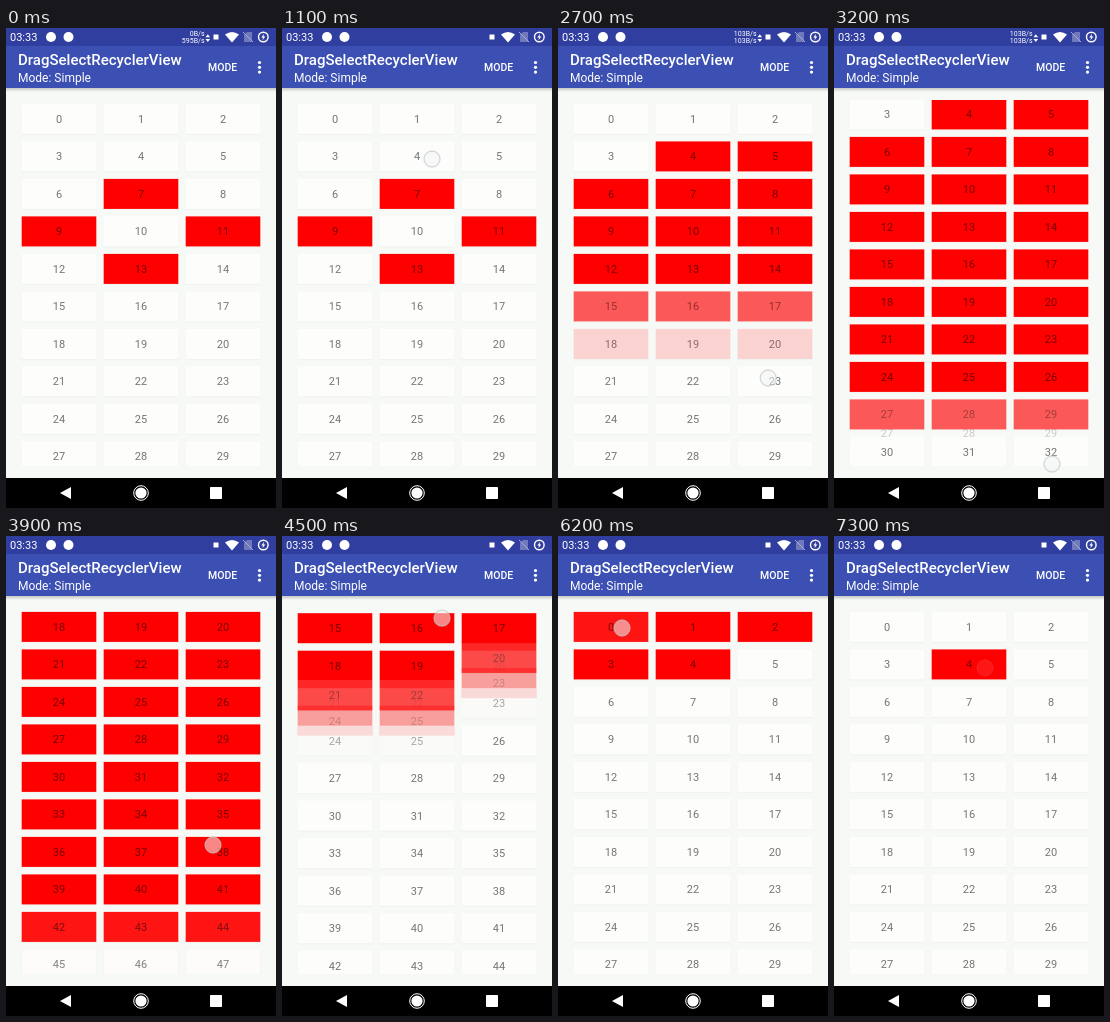
Animation, 270 px wide and 480 px high, one loop 7.4 s. Source, as an HTML page with a canvas:

```html
<!DOCTYPE html>
<html lang="en">
<head>
<meta charset="utf-8">
<title>Drag select list</title>
<style>
  html, body { margin: 0; width: 100%; height: 100%; overflow: hidden; background: #f6f9f5; }
  canvas, svg { position: absolute; left: 0; top: 0; width: 270px; height: 480px; display: block; }
  text { font-family: Roboto, sans-serif; fill: #fff; }
  .medium { font-weight: 500; }
  .speed { font-size: 7px; text-anchor: end; }
</style>
</head>
<body>
<svg viewBox="0 0 270 480">
  <defs>
    <linearGradient id="shade" x2="0" y2="1">
      <stop stop-color="#000" stop-opacity=".2"/>
      <stop offset="1" stop-color="#000" stop-opacity="0"/>
    </linearGradient>
  </defs>
  <rect y="60" width="270" height="4" fill="url(#shade)"/>
  <rect width="270" height="18" fill="#303f9f"/>
  <rect y="18" width="270" height="42" fill="#3b50b2"/>

  <text x="4" y="13" font-size="11">03:33</text>
  <g fill="#fff">
    <circle cx="45" cy="9" r="5"/>
    <circle cx="62.5" cy="9" r="5"/>
    <rect x="207.5" y="6.5" width="5" height="5"/>
    <path d="M219 6.5Q226 1.5 233 6.5L226 14.5Z"/>
  </g>
  <g id="net" fill="#fff">
    <text id="up" class="speed" x="198.5" y="8.3"></text>
    <text id="down" class="speed" x="198.5" y="15"></text>
    <path d="M199.5 9.3h4.6l-2.3-3zM199.5 11h4.6l-2.3 3z"/>
  </g>
  <path d="M238 14V7l3-3h5v10z" fill="#7079bb"/>
  <path d="M237 4l10 10" stroke="#a5abd5"/>
  <circle cx="257.3" cy="9" r="4.8" fill="none" stroke="#fff" stroke-width="1.4"/>
  <path d="M258 5.8l-2.7 3.7h1.7l-.5 2.8 2.8-3.9h-1.8z" fill="#fff"/>

  <text class="medium" x="12" y="37" font-size="15">DragSelectRecyclerView</text>
  <text x="12" y="54" font-size="12">Mode: Simple</text>
  <text class="medium" x="202" y="43" font-size="10.5">MODE</text>
  <g fill="#fff">
    <circle cx="253.5" cy="34.5" r="1.6"/>
    <circle cx="253.5" cy="39.3" r="1.6"/>
    <circle cx="253.5" cy="44.1" r="1.6"/>
  </g>

  <rect y="450" width="270" height="30"/>
  <path d="M54 465l11-6v12z" fill="#fff"/>
  <circle cx="135" cy="465" r="7.3" fill="none" stroke="#fff"/>
  <circle cx="135" cy="465" r="5.6" fill="#fff"/>
  <rect x="204" y="459" width="12" height="12" rx=".8" fill="#fff"/>
</svg>
<canvas id="list"></canvas>
<script>
const LOOP = 7400, TICK = 100, FADE = 250;
const COUNT = 48, ANCHOR = 4, PITCH_X = 82, PITCH_Y = 37.5;
const CELL = { x: 15.7, y: 75.9, w: 74.6, h: 30 };

// [time, end of the dragged range]
const drag = [
  [1250, 4], [1890, 7], [2150, 8], [2300, 11], [2420, 14], [2540, 17], [2660, 20],
  [2780, 23], [2900, 26], [3040, 29], [3240, 32], [3310, 35], [3380, 38], [3450, 41],
  [3520, 44], [3590, 47], [3670, 44], [3890, 41], [3970, 38], [4040, 35], [4110, 32],
  [4180, 28], [4250, 25], [4340, 22], [4460, 19], [4620, 16], [4790, 13], [4950, 10],
  [5120, 7], [5350, 4], [5650, 1], [5970, 0], [6300, 1], [6440, 4]
];
// [time, offset]
const scrollKeys = [[2850, 0], [3040, 23], [3200, 42], [3300, 78], [3620, 225],
  [4300, 225], [5120, 66], [5200, 59], [5700, 0]];
// [time, x, y]
const touchKeys = [[1700, 150, 131], [2000, 154, 186], [2500, 205, 300], [3000, 218, 425],
  [3200, 218, 436], [3600, 218, 434], [3900, 207, 309], [4250, 165, 95], [4600, 158, 77],
  [5400, 158, 77], [5900, 76, 90], [6200, 64, 92], [6350, 130, 100], [6550, 151, 132]];
const touchAlpha = [[600, 0], [800, 1], [6900, 1], [7300, .16]];

function at(keys, t, k = 1) {
  const i = keys.findIndex(key => key[0] > t);
  if (i === 0) return keys[0][k];
  if (i < 0) return keys[keys.length - 1][k];
  const a = keys[i - 1], b = keys[i];
  return a[k] + (b[k] - a[k]) * (t - a[0]) / (b[0] - a[0]);
}

// Every item keeps a log of its selection changes.
const items = Array.from({ length: COUNT }, (_, i) => [{ t: -FADE, on: [7, 9, 11, 13].includes(i) }]);
const inRange = (i, end) => end !== null && i >= Math.min(ANCHOR, end) && i <= Math.max(ANCHOR, end);
let lastEnd = null;
for (const [t, end] of drag) {
  items.forEach((log, i) => {
    const on = inRange(i, end);
    if (on !== inRange(i, lastEnd)) log.push({ t, on });
  });
  lastEnd = end;
}

const canvas = document.getElementById('list');
const ctx = canvas.getContext('2d');
const ratio = window.devicePixelRatio || 1;
canvas.width = 270 * ratio;
canvas.height = 480 * ratio;
ctx.scale(ratio, ratio);

function drawCell(i, scroll, on, alpha) {
  const x = CELL.x + i % 3 * PITCH_X;
  const y = CELL.y + Math.floor(i / 3) * PITCH_Y - scroll;
  if (y > 440 || y + CELL.h < 70) return;
  ctx.globalAlpha = alpha;
  ctx.fillStyle = 'rgba(0,0,0,.025)';
  ctx.fillRect(x - .5, y + .5, CELL.w + 1, CELL.h + .7);
  ctx.fillStyle = on ? '#f00' : '#fdfefc';
  ctx.fillRect(x, y, CELL.w, CELL.h);
  ctx.fillStyle = 'rgba(0,0,0,.54)';
  ctx.fillText(i, x + CELL.w / 2, y + CELL.h / 2 + 4);
}

function drawList(t) {
  const scroll = at(scrollKeys, t);
  ctx.save();
  ctx.beginPath();
  ctx.rect(0, 72, 270, 366);
  ctx.clip();
  ctx.font = '11px Roboto, sans-serif';
  ctx.textAlign = 'center';
  items.forEach((log, i) => {
    let n = log.length - 1;
    while (log[n].t > t) n--;
    const p = Math.min(1, (t - log[n].t) / FADE);
    if (p < 1) {
      // the outgoing view lags behind the scroll
      const lag = at(scrollKeys, log[n].t) - scroll;
      drawCell(i, scroll + Math.max(-20, Math.min(20, lag)), log[n - 1].on, 1 - p);
    }
    drawCell(i, scroll, log[n].on, p);
  });
  ctx.restore();
}

function drawTouch(t) {
  ctx.globalAlpha = at(touchAlpha, t);
  ctx.beginPath();
  ctx.arc(at(touchKeys, t, 1), at(touchKeys, t, 2), 8, 0, Math.PI * 2);
  ctx.fillStyle = 'rgba(240,244,242,.55)';
  ctx.fill();
  ctx.lineWidth = 1.3;
  ctx.strokeStyle = 'rgba(190,196,196,.65)';
  ctx.stroke();
  ctx.globalAlpha = 1;
}

const net = document.getElementById('net');
const up = document.getElementById('up');
const down = document.getElementById('down');
function showSpeed(t) {
  const first = t < 1100, second = t >= 2700 && t < 3700;
  net.style.display = first || second ? '' : 'none';
  up.textContent = first ? '0B/s' : '103B/s';
  down.textContent = first ? '595B/s' : '103B/s';
}

const start = performance.now();
function frame() {
  const t = Math.floor((performance.now() - start) % LOOP / TICK) * TICK;
  ctx.clearRect(0, 0, 270, 480);
  drawList(t);
  drawTouch(t);
  showSpeed(t);
  requestAnimationFrame(frame);
}
frame();
</script>
</body>
</html>
```
